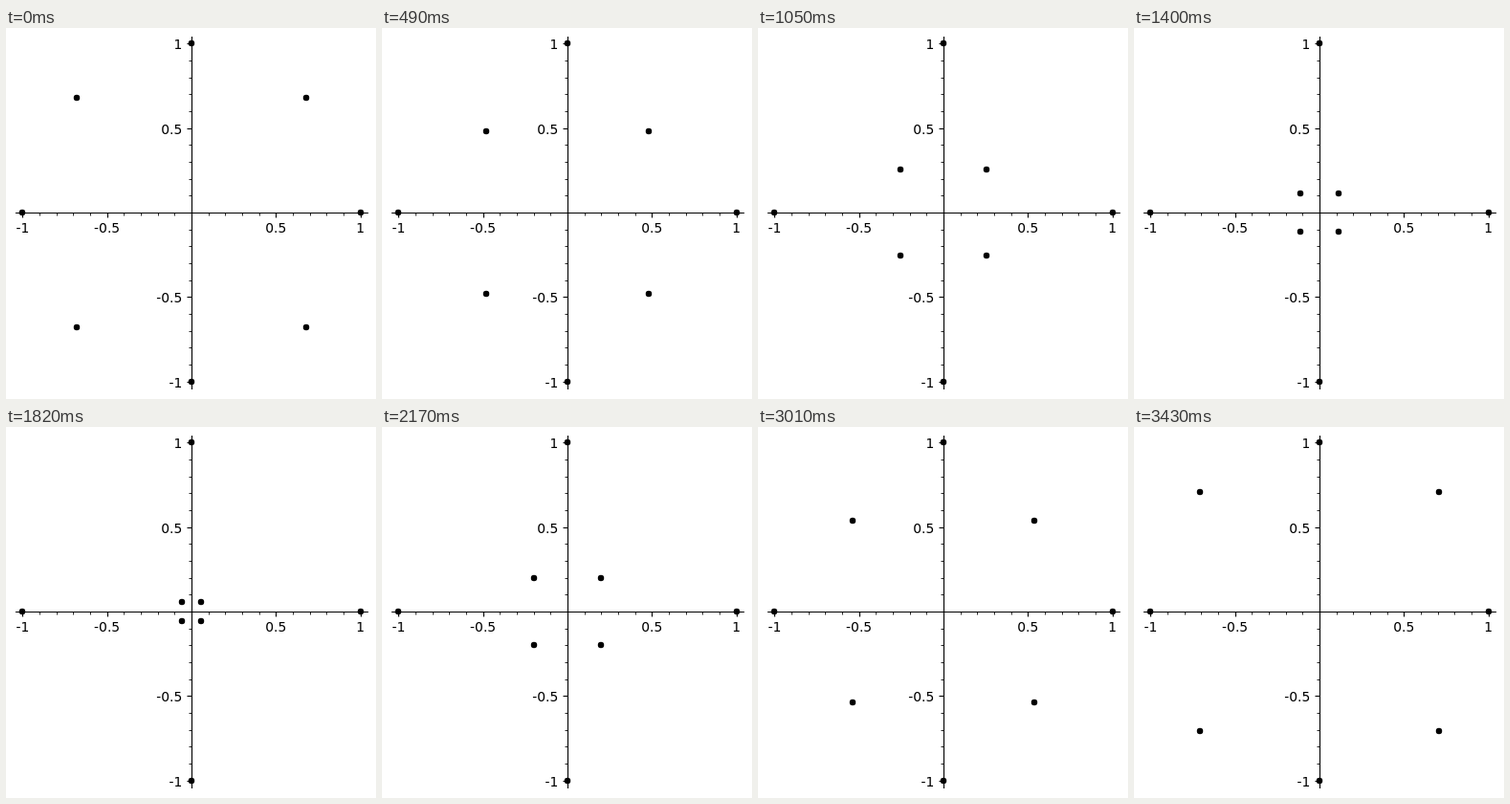
An HTML page that plays this animation: 387x388 px, repeating every 3.5 s.

```html
<!DOCTYPE html>
<html lang="en">
<head>
<meta charset="utf-8">
<title>Points on two diagonals</title>
<style>
  html, body { margin: 0; width: 100%; height: 100%; overflow: hidden; background: #fff; }
  svg { display: block; width: 387px; height: 388px; }
  text { font: 13.89px "DejaVu Sans", sans-serif; }
  line { stroke: #000; stroke-width: 1.11; }
  .minor { stroke-width: 0.83; }
</style>
</head>
<body>
<svg viewBox="0 0 387 388"></svg>
<script>
const svg = document.querySelector("svg");
const CX = 194, CY = 193, UNIT = 176.7;
const STEP_MS = 70, STEPS = 50, STEP_PX = 5, START = 120;

function add(tag, attrs, content = "") {
  const el = document.createElementNS("http://www.w3.org/2000/svg", tag);
  for (const key in attrs) el.setAttribute(key, attrs[key]);
  el.textContent = content;
  svg.append(el);
  return el;
}

const line = (x1, y1, x2, y2, cls = "major") =>
  add("line", { x1, y1, x2, y2, class: cls });
const dot = (cx, cy) => add("circle", { cx, cy, r: 3.24 });
const label = (x, y, anchor, value) =>
  add("text", { x, y, "text-anchor": anchor }, String(value));

// Axes
line(9.94, CY + 0.5, 379.06, CY + 0.5);
line(CX + 0.5, 8.94, CX + 0.5, 378.06);

// Ticks every tenth, labelled every half
for (let i = -10; i <= 10; i++) {
  if (i === 0) continue;
  const major = i % 5 === 0;
  const cls = major ? "major" : "minor";
  const len = major ? 5 : 3;
  const x = CX + UNIT * i / 10, y = CY - UNIT * i / 10;
  const px = Math.round(x) + 0.5, py = Math.round(y) + 0.5;
  line(px, CY + 0.5, px, CY + 0.5 + len, cls);
  line(CX + 0.5, py, CX + 0.5 - len, py, cls);
  if (major) {
    label(x, 214, "middle", i / 10);
    label(184.3, Math.round(y + 6), "end", i / 10);
  }
}

// Fixed points on the axes, moving points on the diagonals
const R = Math.round(UNIT);
for (const [dx, dy] of [[1, 0], [0, 1], [-1, 0], [0, -1]]) {
  dot(CX + dx * R, CY + dy * R);
}

const END = START - STEPS * STEP_PX;
for (const [sx, sy] of [[1, 1], [1, -1], [-1, 1], [-1, -1]]) {
  const at = d => `translate(${sx * d}px, ${sy * d}px)`;
  dot(CX, CY).animate(
    [{ transform: at(START), easing: `steps(${STEPS}, end)` }, { transform: at(END) }],
    { duration: STEPS * STEP_MS, iterations: Infinity }
  );
}
</script>
</body>
</html>
```
